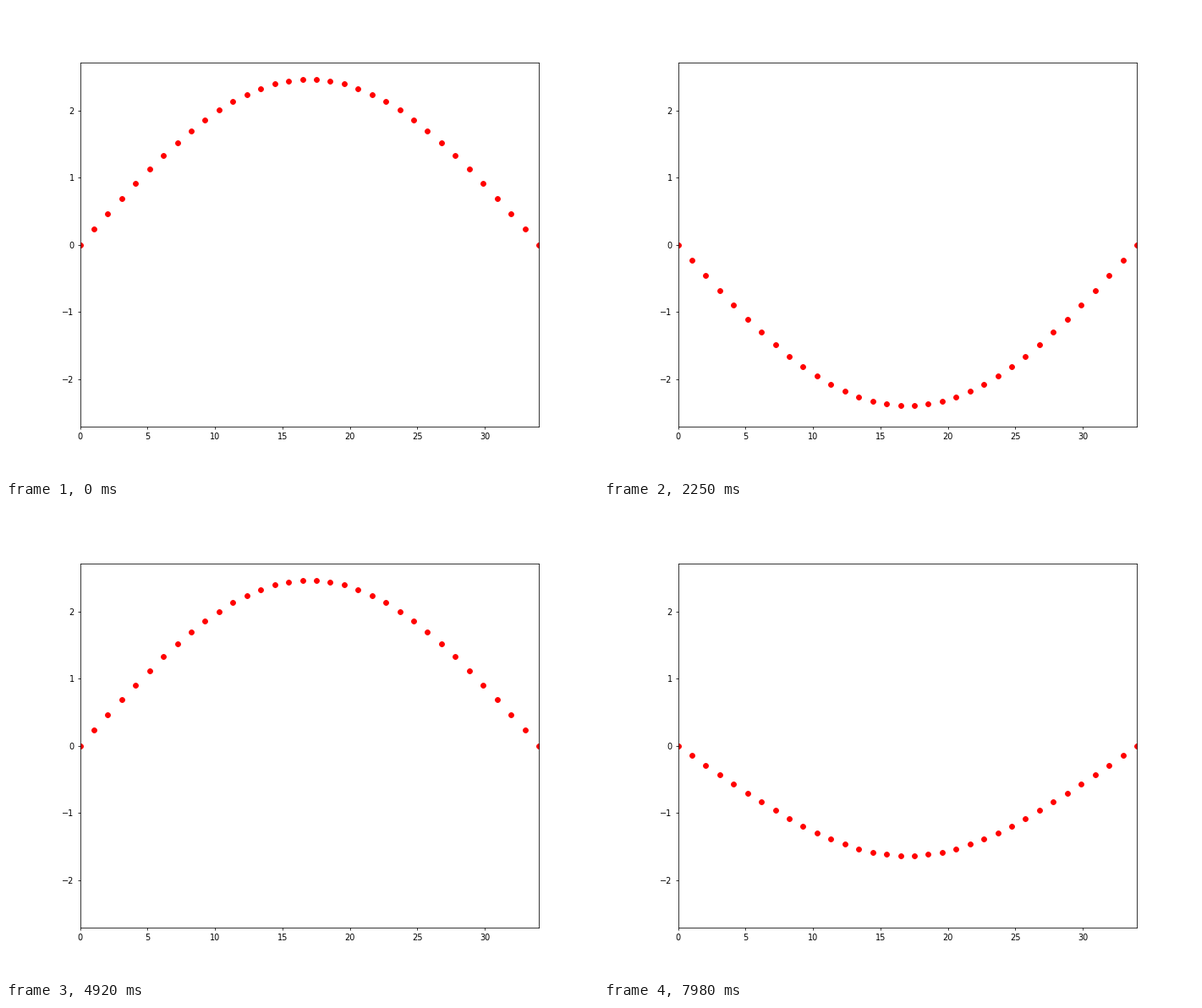
A matplotlib script that plays this animation: 700x560 px, repeating every 8000 ms.

```python
import numpy as np
import matplotlib.pyplot as plt
from matplotlib.animation import FuncAnimation

N = 32            # moving masses between two fixed ends
BETA = 0.9        # cubic spring coefficient
DT = 0.4          # time step of the chain
STEPS = 267
INTERVAL = 20     # ms per drawn frame
FRAMES = 400

amp = 10 * np.sqrt(2 / (N + 1))


def simulate():
    """Beta-FPUT chain started in its lowest mode, semi-implicit Euler."""
    q = amp * np.sin(np.pi * np.arange(N + 2) / (N + 1))
    q[-1] = 0
    v = np.zeros(N)
    states = [q.copy()]
    for _ in range(STEPS - 1):
        stretch = np.diff(q)
        force = stretch + BETA * stretch**3
        v += DT * np.diff(force)
        q[1:-1] += DT * v
        states.append(q.copy())
    return states


states = simulate()

fig, ax = plt.subplots(figsize=(10, 8), dpi=70)
ax.set_xlim(0, N + 2)
ax.set_ylim(-1.1 * amp, 1.1 * amp)
dots, = ax.plot(np.linspace(0, N + 2, N + 2), states[0], "ro")


def update(frame):
    # the chain advances every 30 ms
    dots.set_ydata(states[(2 * frame + 1) // 3])
    return dots,


anim = FuncAnimation(fig, update, frames=FRAMES, interval=INTERVAL,
                     repeat=True, repeat_delay=0)
plt.show()
```
